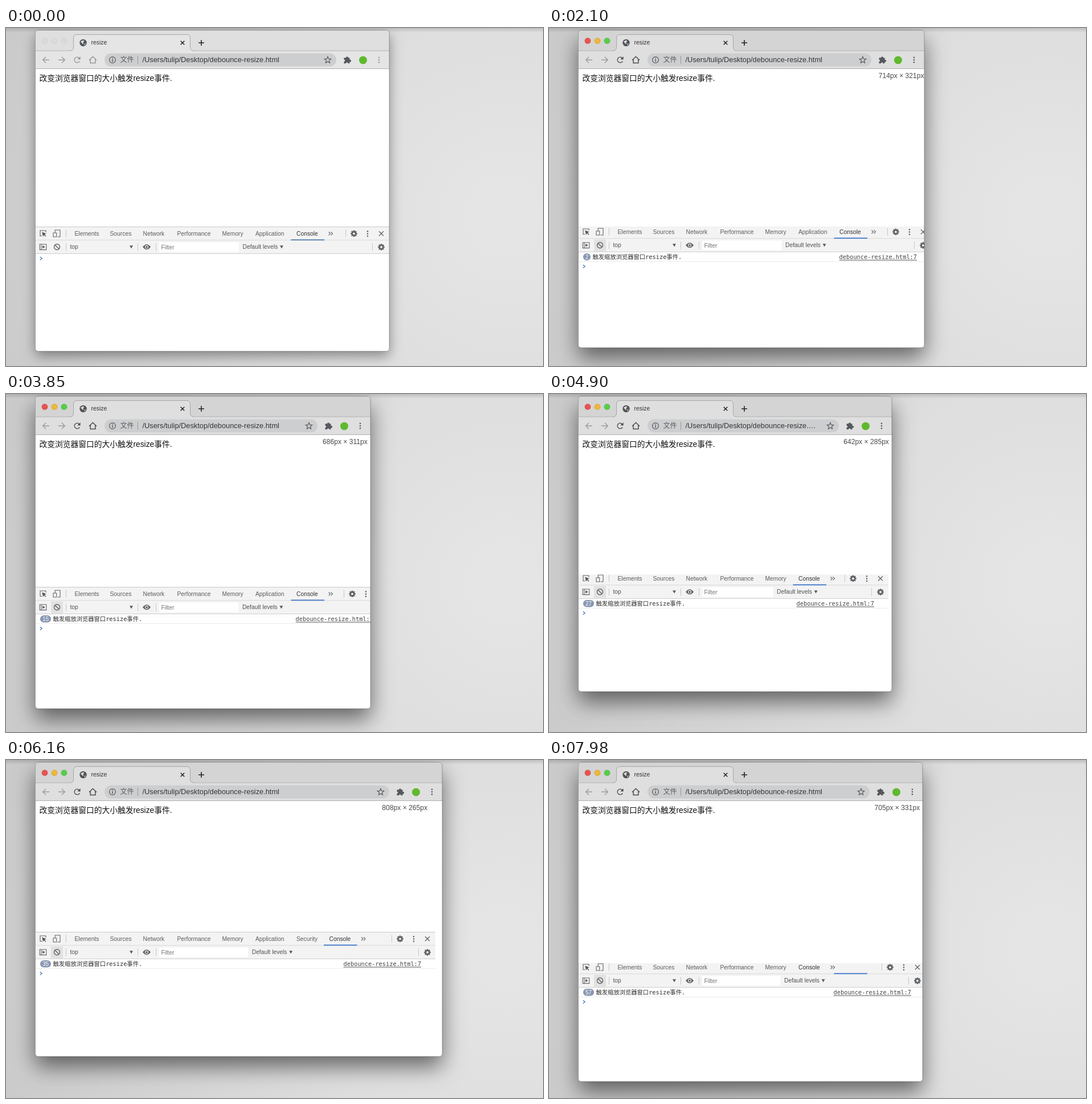
An HTML page with a canvas for the animation above (8000 ms loop, 943 by 594 pixels).

```html
<!DOCTYPE html>
<html lang="zh-CN">
<head>
<meta charset="utf-8">
<title>resize</title>
<style>
html, body { margin: 0; width: 100%; height: 100%; overflow: hidden; background: #d8d8d8; }
canvas { display: block; width: 943px; height: 594px; }
</style>
</head>
<body>
<canvas id="stage" width="943" height="594"></canvas>
<script>
const c = document.getElementById('stage').getContext('2d');
const LOOP = 8000, STEP = 70, ACTIVATE = 1610, RESIZE = 1890;
const LEFT = 51.5, TOP = 4, PAGE = 71.7, TOOLS_HEIGHT = 218.5, SCALE = 0.862;
const SANS = '"Liberation Sans", "Noto Sans CJK SC", "Noto Sans CJK", sans-serif';
const MONO = '"DejaVu Sans Mono", "Noto Sans CJK SC", "Noto Sans CJK", monospace';
const URL_TEXT = '/Users/tulip/Desktop/debounce-resize.html';

// time, right edge of the window, top edge of the tools panel
const PATH = [
  [0, 673, 349.5], [RESIZE, 673, 349.5],
  [2730, 586, 309.5], [2800, 588.5, 309.5], [2870, 589, 309.5],
  [3500, 690, 346], [3640, 676, 341], [3710, 670, 339.6], [3780, 642.8, 339.6], [3850, 640, 334.5],
  [4760, 596, 317.2], [4830, 604.9, 312.5], [4900, 602, 304.5],
  [6020, 753.5, 300.1], [6090, 748, 302.5], [6160, 766, 302.5],
  [6440, 780, 308], [7700, 690, 356],
  [7840, 661, 357], [7910, 659.2, 352.5], [7980, 656, 346.5]
];
const EVENTS = [[0, 0], [RESIZE, 0], [RESIZE + 70, 1], [2870, 8], [3850, 15], [4900, 27], [6160, 35], [7980, 57]];
const TABS = [['Elements', 121], ['Sources', 183], ['Network', 241], ['Performance', 301],
  ['Memory', 380], ['Application', 438.5], ['Security', 510.5], ['', 568]];

function sample(keys, t, column, ease = u => u) {
  const i = keys.findIndex(k => k[0] >= t);
  if (i < 0) return keys[keys.length - 1][column];
  if (i === 0) return keys[0][column];
  const a = keys[i - 1], b = keys[i];
  return a[column] + (b[column] - a[column]) * ease((t - a[0]) / (b[0] - a[0]));
}
const smooth = u => u * u * (3 - 2 * u);
const edgeX = t => sample(PATH, t, 1, smooth);
const edgeY = t => sample(PATH, t, 2, smooth);
const tabCount = right => right >= 722 ? 7 : right >= 665 ? 6 : right >= 593 ? 5 : 4;

function text(s, x, y, size, color, family = SANS, align = 'left') {
  c.font = `${size}px ${family}`;
  c.fillStyle = color;
  c.textAlign = align;
  c.fillText(s, x, y + size * 0.36);
}
function rect(x, y, w, h, color) { c.fillStyle = color; c.fillRect(x, y, w, h); }
function pill(x, y, w, h, r, color) {
  c.beginPath(); c.roundRect(x, y, w, h, r); c.fillStyle = color; c.fill();
}
function disc(x, y, r, color) { c.beginPath(); c.arc(x, y, r, 0, 7); c.fillStyle = color; c.fill(); }
function ring(x, y, r, color, width = 1.3, from = 0, to = 7) {
  c.beginPath(); c.arc(x, y, r, from, to); c.strokeStyle = color; c.lineWidth = width; c.stroke();
}
// Draws an SVG path around a given centre.
function draw(d, x, y, color, width = 1.4) {
  const p = new Path2D(d);
  c.save();
  c.translate(x, y);
  if (width) { c.strokeStyle = color; c.lineWidth = width; c.stroke(p); }
  else { c.fillStyle = color; c.fill(p); }
  c.restore();
}
const vline = (x, y, h, color = '#c6c6c6') => rect(Math.floor(x), y, 1, h, color);
const cross = (x, y, r, color, width) => draw(`M${-r} ${-r}L${r} ${r}M${r} ${-r}L${-r} ${r}`, x, y, color, width);
const triangle = (x, y) => draw('M-3 -2.6H3L0 2.8Z', x, y, '#5c5c5c', 0);
const dots = (x, y, color) => [-4.3, 0, 4.3].forEach(d => disc(x, y + d, 1.3, color));
function gear(x, y) {
  for (let i = 0; i < 8; i++) {
    const a = i * Math.PI / 4;
    draw(`M0 0L${5.8 * Math.cos(a)} ${5.8 * Math.sin(a)}`, x, y, '#5f6368', 2.5);
  }
  disc(x, y, 4.5, '#5f6368');
  disc(x, y, 1.9, '#f3f3f3');
}

function background() {
  const g = c.createRadialGradient(880, 330, 40, 880, 330, 950);
  g.addColorStop(0, '#e5e5e5');
  g.addColorStop(0.35, '#dedede');
  g.addColorStop(1, '#cacaca');
  rect(0, 0, 943, 594, g);
  const shade = c.createLinearGradient(0, 0, 0, 8);
  shade.addColorStop(0, 'rgba(0,0,0,.14)');
  shade.addColorStop(1, 'rgba(0,0,0,0)');
  rect(0, 0, 943, 8, shade);
}

function tabStrip(right, active) {
  const bar = active ? '#dfdfdf' : '#e5e5e5';
  rect(LEFT, TOP, right - LEFT, 36, active ? '#d4d4d4' : '#dfdfdf');
  rect(LEFT, 40, right - LEFT, 32, bar);
  rect(LEFT, 39.5, right - LEFT, 1, '#b4b4b4');
  rect(LEFT, 71, right - LEFT, 1, '#b0b0b0');
  const tab = 'M112 40Q118.5 40 118.5 34V18Q118.5 11.5 125 11.5H317Q323.5 11.5 323.5 18V34Q323.5 40 330 40';
  draw(tab + 'V41H112Z', 0, 0, bar, 0);
  draw(tab, 0, 0, '#a6a6a6', 1);
  ['#e9544f', '#efb73b', '#55cf49'].forEach((color, i) => {
    disc(68 + 17 * i, 22.5, 5.3, active ? color : '#dadada');
    ring(68 + 17 * i, 22.5, 5, active ? 'rgba(0,0,0,.12)' : '#d0d0d0', 0.8);
  });
  disc(135.5, 26, 6.2, '#505458');
  draw('M-4.6 -1.5Q-2 -4.5 1 -4.5L1.5 -2.5L-.5 -1L1 .6L-1 2.2L-2 .2ZM1.4 4.5L2.5 1.8L4.6 1Q4 3.5 1.4 4.5Z', 135.5, 26, bar, 0);
  text('resize', 149.5, 25.5, 10.4, '#333');
  cross(310, 26, 3.3, '#222', 1.5);
  draw('M-5 0H5M0 -5V5', 343, 26, '#222', 1.6);
}

function toolbar(right, active) {
  const strong = active ? '#4b4d50' : '#979797', pale = '#9c9c9c';
  draw('M6 0H-5M0 -5.3L-5.3 0L0 5.3', 70, 56, pale);
  draw('M-6 0H5M0 -5.3L5.3 0L0 5.3', 98, 56, pale);
  ring(125, 56, 4.8, strong, 1.5, 0.5, 5.6);
  draw('M5.6 -6V-.8H.4Z', 125, 56, strong, 0);
  draw('M-6.5 .5L0 -5.8L6.5 .5M-4.4 -1V5.5H4.4V-1', 152.5, 56, strong, 1.5);
  pill(173, 44.5, right - 93 - 173, 23, 11.5, '#cdcecf');
  ring(187, 56, 5.4, '#55585c', 1.2);
  rect(186.3, 55, 1.5, 4, '#55585c');
  rect(186.3, 52.5, 1.5, 1.5, '#55585c');
  text('文件', 200.5, 56, 12.1, '#5a5d61');
  vline(231, 49, 14, '#999');

  c.font = `12.8px ${SANS}`;
  let url = URL_TEXT, keep = URL_TEXT.length;
  while (c.measureText(url).width > right - 127 - 239.5) url = URL_TEXT.slice(0, --keep) + '…';
  text(url, 239.5, 55.7, 12.8, '#343537');

  let star = '';
  for (let i = 0; i < 10; i++) {
    const r = i % 2 ? 2.7 : 6, a = i * Math.PI / 5 - Math.PI / 2;
    star += `${i ? 'L' : 'M'}${r * Math.cos(a)} ${r * Math.sin(a)}`;
  }
  draw(star + 'Z', right - 108, 56.3, '#55585c', 1.2);
  draw('M-5.5 -4H-2A2 2 0 1 1 2 -4H4.5V-.5A2 2 0 1 1 4.5 3.3V6H1.7A1.8 1.8 0 0 0 -2 6H-5.5V2.8A1.8 1.8 0 0 0 -5.5 -.8Z',
    right - 74, 56.3, '#55585c', 0);
  disc(right - 46, 56.5, 7, '#5fb92e');
  dots(right - 18, 56, active ? '#55585c' : '#999');
}

function toolTabs(right, sliderTabs, y, active) {
  const shown = tabCount(right), mid = y + 11.5;
  rect(LEFT, y, right - LEFT, 24, '#f3f3f3');
  rect(LEFT, y - 0.5, right - LEFT, 1, '#c9c9c9');
  rect(LEFT, y + 23, right - LEFT, 1, '#cfcfcf');
  draw('M5 -2V-5H-5V4.5H-1.5', 65, mid, '#606367', 1.1);
  draw('M-1.8 -2.5L5.8 .5L2.8 1.8L5.4 5L4.4 5.8L1.8 2.8L.2 5.4Z', 65, mid, '#505357', 0);
  draw('M-2.8 -1V-6H6V6H1.5M-6 -1H-.3V6H-6Z', 89, mid, '#606367', 1.1);
  vline(105, y + 5, 13);
  TABS.slice(0, shown).forEach(([name, x]) => text(name, x - 0.5, mid - 0.2, 10.3, '#5a5c5f'));
  const x = TABS[shown][1];
  text('Console', x - 0.5, mid - 0.2, 10.3, '#333');
  rect(TABS[sliderTabs][1] - 10, y + 22, 58.5, 2, active ? '#3b73c8' : '#4a78a8');
  draw('M-4 -3L-1 0L-4 3M0 -3L3 0L0 3', x + 60, mid + 0.3, '#5f6368', 1.2);
  vline(right - 77, y + 5, 13);
  gear(right - 62, mid + 0.3);
  dots(right - 38, mid + 0.5, '#5f6368');
  cross(right - 14, mid + 0.3, 4, '#5f6368', 1.3);
}

function consoleBar(right, y, active) {
  const mid = y + 11.3, levels = 416 + 0.2 * (right - 673);
  rect(LEFT, y, right - LEFT, 23, '#f3f3f3');
  rect(LEFT, y + 22.5, right - LEFT, 1, '#cfcfcf');
  if (active) rect(79, y + 1, 21, 21, '#e1e1e1');
  draw('M-5.8 -4.8H5.8V4.8H-5.8ZM-3 -4.8V4.8', 65, mid, '#606367', 1.1);
  draw('M-1 -2.8L3.8 0L-1 2.8Z', 65, mid, '#606367', 0);
  ring(89.5, mid, 5, '#5f6368', 1.4);
  draw('M-3.5 -3.5L3.5 3.5', 89.5, mid, '#5f6368', 1.4);
  [105, 231, 263, right - 30].forEach(x => vline(x, y + 5, 13));
  text('top', 112.5, mid - 0.2, 10.3, '#4f5154');
  triangle(220, mid);
  draw('M-7 0Q0 -9 7 0Q0 9 -7 0Z', 247, mid, '#5f6368', 0);
  disc(247, mid, 3, '#f3f3f3');
  disc(247, mid, 1.9, '#5f6368');
  rect(269, y + 3, levels - 7 - 269, 17, '#fff');
  text('Filter', 272.5, mid + 0.2, 10.3, '#757575');
  text('Default levels', levels - 0.5, mid - 0.2, 10.3, '#4f5154');
  triangle(levels + 68, mid);
  gear(right - 14, mid + 0.2);
}

function messages(right, y, count) {
  if (count) {
    const mid = y + 56, badge = count < 2 ? 0 : count < 10 ? 13 : 19;
    if (badge) {
      pill(60, mid - 6.5, badge, 12.5, 6.25, '#8997b2');
      text(count, 60 + badge / 2, mid - 0.2, 10, '#fff', SANS, 'center');
    }
    text('触发缩放浏览器窗口resize事件.', badge ? 63.5 + badge : 66, mid, 10.3, '#303030', MONO);
    const link = 'debounce-resize.html:7';
    text(link, right - 25, mid, 10.3, '#444', MONO, 'right');
    const width = c.measureText(link).width;
    rect(right - 25 - width, mid + 5, width, 1, '#555');
    rect(LEFT, y + 63.5, right - LEFT, 1, '#ececec');
  }
  draw('M-1.8 -2.8L1.4 0L-1.8 2.8', 61.7, y + (count ? 72.5 : 55.5), '#4a72c8', 1.3);
}

function render(time) {
  const t = Math.floor(time / STEP) * STEP;
  const active = t >= ACTIVATE, resizing = t > RESIZE;
  const right = Math.round(edgeX(t)), bottom = edgeY(t) + TOOLS_HEIGHT;
  // The page and the tools panel lay out a little after the window frame.
  const pageRight = edgeX(t - 70), pageBottom = edgeY(t - 140);
  const toolsRight = Math.round(edgeX(t - 140)), toolsTop = Math.round(edgeY(t - 70) * 2) / 2;
  const count = Math.floor(sample(EVENTS, t, 1) + 1e-6);

  background();
  c.save();
  c.shadowColor = `rgba(0,0,0,${active ? 0.55 : 0.4})`;
  c.shadowBlur = active ? 38 : 22;
  c.shadowOffsetY = active ? 18 : 8;
  pill(LEFT, TOP, right - LEFT, bottom - TOP, 5, '#fff');
  c.restore();

  c.save();
  c.beginPath();
  c.roundRect(LEFT, TOP, right - LEFT, bottom - TOP, 5);
  c.clip();
  rect(LEFT, TOP, right - LEFT, bottom - TOP, '#fff');
  toolTabs(toolsRight, tabCount(edgeX(t - 210)), toolsTop, active);
  consoleBar(toolsRight, toolsTop + 24, active);
  messages(toolsRight, toolsTop, count);
  if (pageBottom > toolsTop + 1) rect(LEFT, PAGE, right - LEFT, pageBottom - PAGE, '#fff');
  tabStrip(right, active);
  toolbar(right, active);
  text('改变浏览器窗口的大小触发resize事件.', 58.5, 88.5, 13.75, '#111');
  if (resizing) {
    const w = Math.round((pageRight - LEFT) / SCALE), h = Math.round((pageBottom - PAGE) / SCALE);
    text(`${w}px × ${h}px`, pageRight - 8, 83.5, 12.1, '#4a4a4a', SANS, 'right');
  }
  c.restore();

  c.beginPath();
  c.roundRect(LEFT, TOP, right - LEFT, bottom - TOP, 5);
  c.strokeStyle = 'rgba(0,0,0,.28)';
  c.lineWidth = 1;
  c.stroke();
}

const start = performance.now();
function tick() {
  render((performance.now() - start) % LOOP);
  requestAnimationFrame(tick);
}
tick();
</script>
</body>
</html>
```
